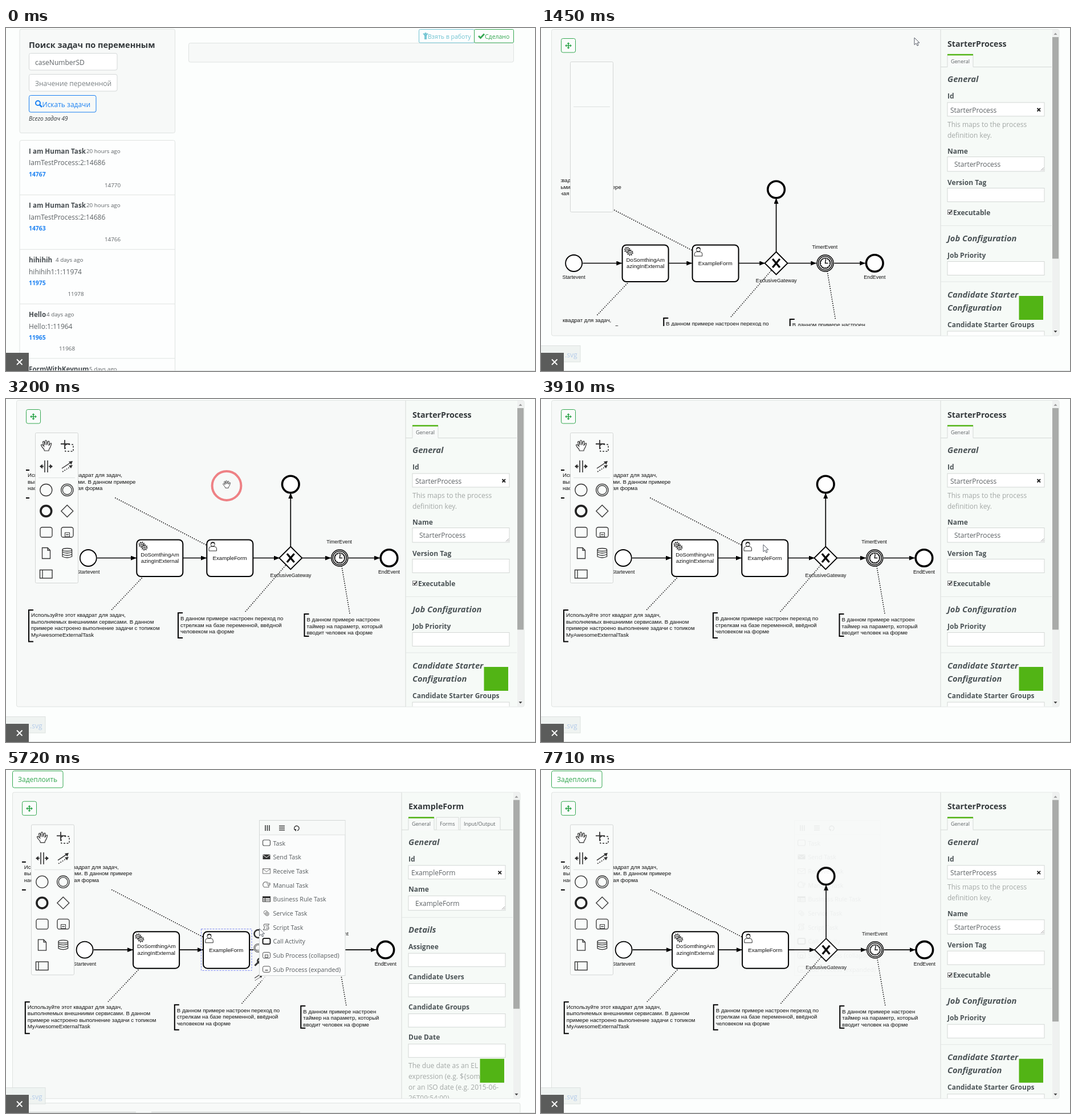
These frames come from a looping animation (928x603 px, 8.74 s). An HTML page:

```html
<!DOCTYPE html>
<html lang="ru">
<head>
<meta charset="utf-8">
<title>Process modeler</title>
<style>
html, body { margin: 0; width: 100%; height: 100%; overflow: hidden; background: #fcfefd; }
svg { display: block; width: 100%; height: 100%; }
text { font-family: "Open Sans", "Noto Sans", sans-serif; white-space: pre; }
.diagram text { font-family: "Liberation Sans", Arial, sans-serif; fill: #111; }
.b { font-weight: 700; }
.i { font-style: italic; }
</style>
</head>
<body>
<svg id="stage" viewBox="0 0 928 603">
  <defs>
    <marker id="arrow" viewBox="0 0 10 8" refX="10" refY="4" markerWidth="10" markerHeight="8" markerUnits="userSpaceOnUse" orient="auto"><path d="M0 0L10 4L0 8Z"/></marker>
    <clipPath id="canvasClip"><rect x="35" y="4" width="665" height="520"/></clipPath>
    <clipPath id="propsClip"><rect x="700" y="3" width="209" height="537.5"/></clipPath>
  </defs>
</svg>
<script>
const INK = '#33383b', GREY = '#5d6265', MUTED = '#a3a8a6', LINE = '#dfe3e1', PANEL = '#f7f9f8';
const BLUE = '#1a80f2', GREEN = '#35a852';

const text = (x, y, s, size = 12, fill = GREY, cls = '', extra = '') =>
  `<text x="${x}" y="${y}" font-size="${size}" fill="${fill}" class="${cls}" ${extra}>${s}</text>`;
const box = (x, y, w, h, fill = 'none', stroke = 'none', r = 0, sw = 1, extra = '') =>
  `<rect x="${x}" y="${y}" width="${w}" height="${h}" rx="${r}" fill="${fill}" stroke="${stroke}" stroke-width="${sw}" ${extra}/>`;
const ring = (x, y, r, sw = 1.3, stroke = '#333', fill = 'none') =>
  `<circle cx="${x}" cy="${y}" r="${r}" fill="${fill}" stroke="${stroke}" stroke-width="${sw}"/>`;
const path = (d, sw = 1.3, stroke = '#333', fill = 'none', extra = '') =>
  `<path d="${d}" fill="${fill}" stroke="${stroke}" stroke-width="${sw}" ${extra}/>`;
const group = (s, attrs = '') => `<g ${attrs}>${s}</g>`;
const at = (x, y, s, k = 1) => group(s, `transform="translate(${x} ${y}) scale(${k})"`);
const diamond = (x, y, r, sw, fill = 'none', stroke = '#333') =>
  path(`M${x} ${y - r}L${x + r} ${y}L${x} ${y + r}L${x - r} ${y}Z`, sw, stroke, fill);
const middle = 'text-anchor="middle"', end = 'text-anchor="end"';

const hand = path('M-3 9L-4 6Q-8 2 -9 -1Q-8 -3 -6 -1L-4 1L-6 -6Q-5 -9 -3.5 -6.5L-2 -1V-8Q-.5 -11 1 -8V-1L3 -7Q5 -9 5.5 -6.5L4.5 0L7.5 -4Q9.5 -5 9 -2.5Q7 4 5 6.5L4.5 9Z', 1.2, '#333', '#fff');
const gear = (x, y, r) => ring(x, y, r, 1, '#222', '#fff') + ring(x, y, r * .4, 1, '#222') +
  `<circle cx="${x}" cy="${y}" r="${r + 1}" fill="none" stroke="#222" stroke-width="2" stroke-dasharray="${r * .4} ${(r + 1) * Math.PI / 4 - r * .4}"/>`;
const wrench = path('M-6 6L2 -2', 3) + path('M6.5 -4A4 4 0 1 1 2.5 -6.5', 2.4);
const connect = path('M-9 4L6 -6', 1.5) + path('M10 -9L7.5 -2.5L3 -8Z', 0, 'none', '#333') +
  path('M-8 10L6 1', 1.5, '#333', 'none', 'stroke-dasharray="2 2"') + path('M10 -2L7 4L3 -1Z', 0, 'none', '#333');

function listPage() {
  let s = box(24, 2, 272.5, 182.5, PANEL, LINE, 3) +
    text(40, 34.5, 'Поиск задач по переменным', 14.5, INK, 'b') +
    box(40.5, 44.5, 154.5, 29.5, '#fff', '#d4d8d8', 3) + text(51, 64.5, 'caseNumberSD') +
    box(40.5, 81.5, 154.5, 29.5, '#fff', '#d4d8d8', 3) + text(51, 101.5, 'Значение переменной', 12, '#7c8285') +
    box(40.5, 118.5, 117.5, 29.5, 'none', BLUE, 3) +
    ring(56, 132, 4, 2, BLUE) + path('M59 135L63 139', 2.6, BLUE) +
    text(63.5, 138.5, 'Искать задачи', 12, BLUE) +
    text(40, 163, 'Всего задач 49', 10, INK, 'i') +
    box(24, 197.5, 272.5, 420, '#fdfefe', LINE, 3);
  const tasks = [
    ['I am Human Task', '20 hours ago', 'IamTestProcess:2:14686', 14767, 14770, 141, 201],
    ['I am Human Task', '20 hours ago', 'IamTestProcess:2:14686', 14763, 14766, 141, 201],
    ['hihihih', '4 days ago', 'hihihih1:1:11974', 11975, 11978, 87, 136.5],
    ['Hello', '4 days ago', 'Hello:1:11964', 11965, 11968, 71, 121],
    ['FormWithKeynum', '5 days ago', '', '', '', 146, 196]];
  tasks.forEach(([name, age, proc, id, num, ax, nx], k) => {
    const y = 197.5 + k * 95.85;
    if (k) s += path(`M24 ${y}H296.5`, 1, LINE);
    s += text(40, y + 23, name, 11.65, '#464c50', 'b') + text(ax, y + 22, age, 9.8) +
      text(40, y + 43.5, proc) + text(40, y + 63, id, 10.4, BLUE, 'b') +
      text(nx, y + 82, num, 9.8, GREY, '', end);
  });
  const teal = '#6fc3d1';
  return s + box(320.5, 26.5, 570, 33.5, PANEL, LINE, 3) +
    box(724.5, 2.5, 97, 23.5, '#fdfefe', teal, 2) + box(821.5, 2.5, 69, 23.5, '#fdfefe', GREEN, 2) +
    ring(736, 10, 1.2, 1.6, teal) + path('M732 9.5L734.5 12.5H737.5L740 9.5M735 12V20M737 12V20', 1.8, teal) +
    text(740, 18.5, 'Взять в работу', 10.5, teal) +
    path('M829 14L832.5 17.5L839 10.5', 2.8, GREEN) + text(840, 18.5, 'Сделано', 10.5, GREEN);
}

function diagram() {
  const flow = d => path(d, 1.7, '#000', 'none', 'marker-end="url(#arrow)"');
  const dots = d => path(d, 1.8, '#111', 'none', 'stroke-dasharray="0 3.8" stroke-linecap="round"');
  const label = (x, y, s, size = 8.8) => text(x, y, s, size, '', '', middle);
  const note = (x, y, h, tx, ty, ...lines) =>
    path(`M${x + 8} ${y}H${x}V${y + h}H${x + 8}`, 2, '#000') +
    lines.map((s, k) => text(tx, ty + k * 11.6, s, 9.65)).join('');
  const task = x => box(x, 247.5, 81, 64.5, '#fff', '#000', 7, 2);
  let ticks = '';
  for (let k = 0; k < 12; k++) ticks += `<path d="M0 -9V-7" stroke="#111" transform="rotate(${k * 30})"/>`;
  return note(33, 125, 49, 38, 137, 'Используйте этот квадрат для задач,', 'выполняемых людьми. В данном примере', 'настроена несложная форма') +
    note(40, 371, 55.5, 44, 383, 'Используйте этот квадрат для задач,', 'выполняемых внешниими сервисами. В данном', 'примере настроено выполнение задачи с топиком', 'MyAwesomeExternalTask') +
    note(302, 376, 44, 306, 389, 'В данном примере настроен переход по', 'стрелкам на базе переменной, ввёдной', 'человеком на форме') +
    note(523.5, 378, 39, 527.5, 391, 'В данном примере настроен', 'таймер на параметр, который', 'вводит человек на форме') +
    dots('M192 174L352 257') + dots('M238 315L184 372') + dots('M589 294L603 377') +
    flow('M160 279.5H229') + flow('M311 279.5H352') + flow('M433 279.5H480') +
    flow('M519 279.5H570') + flow('M601 279.5H656') + flow('M499.3 259V165') +
    ring(144.3, 279.5, 14.5, 1.8, '#000', '#fff') + label(144.3, 307, 'Startevent') +
    task(229.3) + gear(238, 256, 3.6) + gear(243, 261, 3.6) +
    label(270, 276.5, 'DoSomthingAm', 9.65) + label(270, 288, 'azingInExternal', 9.65) +
    task(352.3) + path('M356 267V263Q356 260 359.5 259.5H366Q369.5 260 369.5 263V267Z', 1, '#333', '#fff') +
    ring(362.7, 255.5, 3.6, 1, '#333', '#fff') + path('M359.5 254Q363 250 366 254', 2, '#222') +
    label(392.5, 283, 'ExampleForm', 9.65) +
    diamond(499.3, 279.5, 20, 1.8, '#fff', '#000') + path('M493 272L505.6 287M505.6 272L493 287', 3.4, '#000') +
    label(499.5, 313, 'ExclusiveGateway') + dots('M490 293L418 376') +
    ring(499.3, 150, 14.8, 3.6, '#000', '#fff') +
    ring(585.3, 279.5, 14.5, 1.5, '#000', '#fff') + ring(585.3, 279.5, 12, 1.5, '#000') +
    at(585.3, 279.5, ring(0, 0, 9, 1.6, '#111') + ticks + path('M1 -7L0 0H5', 1.5, '#111')) +
    label(584.5, 254, 'TimerEvent') +
    ring(672, 279.5, 14.8, 3.6, '#000', '#fff') + label(672, 307, 'EndEvent');
}

const paletteIcons = () =>
  at(70.5, 82, hand) +
  path('M103 72V88M96 79H112', 1.8) + box(104, 80, 14, 12, 'none', '#333', 0, 1.5, 'stroke-dasharray="3 2.5"') +
  path('M68 108V129M73 108V129', 1.6) + path('M60 118.5H66M75 118.5H81', 1.8) +
  path('M59 118.5L64 114.5V122.5ZM82 118.5L77 114.5V122.5Z', 0, 'none', '#333') +
  at(107, 118, connect) +
  ring(70.3, 160, 10.5) + ring(107.3, 160, 10.7) + ring(107.3, 160, 8) +
  ring(70.3, 197, 9.4, 3.6, '#222') + diamond(107.3, 197, 10.5, 1.3) +
  box(60, 225.5, 21, 17.5, 'none', '#333', 3.5, 1.3) + box(97, 225.5, 21, 17.5, 'none', '#333', 3.5, 1.3) +
  box(103.5, 235, 8, 7, 'none', '#333', 0, 1) + path('M105 238.5H110') +
  path('M63.5 261.5H73L77.5 266V280.5H63.5ZM73 261.5V266H77.5') +
  path('M99 265V277Q107.3 281 115.6 277V265M99 269Q107.3 273 115.6 269M99 273Q107.3 277 115.6 273') +
  '<ellipse cx="107.3" cy="265" rx="8.3" ry="2.5" fill="none" stroke="#333" stroke-width="1.3"/>' +
  box(59.5, 300.5, 21.5, 14.5, 'none', '#333', 0, 1.4) + path('M64 300.5V315');

const label = (y, s) => text(713, y, s, 12, '#4b5356', 'b');
const head = (y, s) => text(713, y, s, 14.7, '#4b5356', 'b i');
const rule = y => path(`M701 ${y}H896`, 1, '#e3e7e5');
const field = (y, h = 24) => box(713, y, 170, h, '#fff', '#d3d7d5');
const area = (y, s) => field(y, 25.5) + text(725, y + 17.5, s) +
  path(`M877 ${y + 24}L882 ${y + 19}M880 ${y + 24}L882 ${y + 22}`, 1, '#999');
const hint = (y, s) => text(713, y, s, 12, MUTED);

function propsTop(name, tabs, thumb) {
  let s = text(713, 32.5, name, 14.2, INK, 'b') + path('M701 68.5H896', 1, '#d5d9d7');
  tabs.forEach(([x, w, t], k) => {
    s += path(`M${x} 68.5V46.5H${x + w}V68.5`, 1, '#d5d9d7', '#f8faf9') + text(x + 6, 61.5, t, 9);
    if (!k) s += path(`M${x} 47H${x + w}`, 2.6, '#52b415') + path(`M${x + .5} 68.5H${x + w - .5}`, 1.4, '#f8faf9');
  });
  return s + head(95, 'General') + label(124, 'Id') + field(131) + text(718, 148.5, name) +
    path('M870.5 141L876 146.5M876 141L870.5 146.5', 1.9, '#222') + box(897, 16, 11, thumb, '#a9aba9');
}

const processProps = () => propsTop('StarterProcess', [[713, 45, 'General']], 389.5) +
  hint(173.5, 'This maps to the process') + hint(192.5, 'definition key.') +
  label(220.5, 'Name') + area(226.5, 'StarterProcess') +
  label(275.5, 'Version Tag') + field(281.5) +
  box(713.5, 320, 7.5, 7.5, '#fff', '#777') + path('M715 323.5L717 326L720.5 321', 1.5, '#222') +
  text(723, 328.5, 'Executable', 12, '#4b5356', 'b') + rule(347.5) +
  head(374.5, 'Job Configuration') + label(403.5, 'Job Priority') + field(410.5) + rule(446) +
  head(473.5, 'Candidate Starter') + head(496.5, 'Configuration') +
  label(525.5, 'Candidate Starter Groups') + field(533);

const taskProps = () => propsTop('ExampleForm', [[713, 45, 'General'], [762, 39, 'Forms'], [804, 70, 'Input/Output']], 367) +
  label(177.5, 'Name') + area(184.5, 'ExampleForm') + rule(222.5) + head(249, 'Details') +
  ['Assignee', 'Candidate Users', 'Candidate Groups', 'Due Date'].map((s, k) =>
    label(278 + k * 53.2, s) + field(285.5 + k * 53.2, 23.5)).join('') +
  ['The due date as an EL', 'expression (e.g. ${someDate})', 'or an ISO date (e.g. 2015-06-', '26T09:54:00)'].map((s, k) =>
    hint(487 + k * 19.2, s)).join('');

const modeler = () =>
  box(18.5, -35, 88.5, 29.5, '#fdfefe', GREEN, 3) + text(28, -15.5, 'Задеплоить', 12, GREEN) +
  box(18.5, 2.5, 890.5, 538.5, PANEL, LINE, 3) +
  group(group(diagram(), 'id="diagram" class="diagram"'), 'clip-path="url(#canvasClip)"') +
  box(35.5, 18.5, 25, 24.5, '#fafcfb', GREEN, 3) +
  path('M43.5 31H52.5M48 26.5V35.5', 1.7, GREEN) +
  path('M48 25l2.5 3h-5zM48 37l2.5 -3h-5zM42 31l3 -2.5v5zM54 31l-3 -2.5v5z', 0, 'none', GREEN) +
  box(51.5, 59.5, 75, 264, '#f9fbfa', '#d3d6d5', 2) + path('M57 138.5H121', 1, '#dde0df') +
  group(paletteIcons(), 'id="icons"') +
  box(701, 3, 196, 537.5, '#f6faf7') + path('M701 3V541', 1, '#d5d9d7') +
  box(897, 3, 11.5, 537.5, '#eff1f0') +
  path('M899.5 12L902.5 8.5L905.5 12Z', 0, 'none', '#999') + path('M899.5 532L902.5 535.5L905.5 532Z', 0, 'none', '#444') +
  group(group(processProps(), 'id="processProps"') + group(taskProps(), 'id="taskProps"'), 'clip-path="url(#propsClip)"') +
  box(838.5, 471, 42.5, 42, '#52b415');

const pad = () => box(434, 278, 38, 92, PANEL, 'none', 0, 0, 'opacity=".75"') +
  ring(442.5, 288, 7, 2.6) + diamond(462, 287.5, 7.5, 1.2) + box(473.5, 281.5, 15.5, 12, '#f8faf9', '#444', 3, 1.2) +
  ring(442.5, 313, 7.5, 1.1, '#555') + ring(442.5, 313, 5.5, 1.1, '#555') +
  path('M469 306H465V320H469', 1.2) + path('M455 319L464 312', 1.2, '#333', 'none', 'stroke-dasharray="2 2"') +
  at(442.5, 338, wrench) + path('M457.5 334H466.5L465.5 346H458.5ZM456 333H468M460 332V330.5H464V332M460.5 336V344M463.5 336V344', 1.1) +
  at(442.5, 363, connect, .7);

function menu() {
  const icons = [
    box(450.5, 123, 13, 10, 'none', '#555', 2.5, 1.2),
    box(450.5, 148.5, 13, 8.5, '#333') + path('M450.5 149L457 154L463.5 149', 1, '#fff'),
    box(450.5, 173.5, 13, 8.5, 'none', '#777') + path('M450.5 174L457 179L463.5 174', 1, '#777'),
    path('M451 200Q453 196 456 197H459M457 199H463V202H461V206H453Q450 204 451 200M458 202H462', 1.1, '#666'),
    box(450.5, 222.5, 13, 9, 'none', '#333') + box(450.5, 222.5, 13, 3, '#333') + path('M450 228.5H464M454.5 225V231', 1),
    ring(455.5, 250.5, 3.2, 1, '#777') + ring(458, 253, 3.2, 1, '#666', '#fbfcfc') + ring(458, 253, 1.2, .9, '#666'),
    path('M453 271H462Q458 274 461 277Q462 280 459 281H451Q455 278 453 275Q451 273 453 271M455 274H459M456 278H460', 1, '#555'),
    box(450.5, 296, 13, 10, 'none', '#222', 2.5, 2),
    box(450.5, 320.5, 13, 10.5, 'none', '#555', 2.5) + box(454.5, 325, 5, 4.5, 'none', '#555'),
    box(450.5, 345, 13, 10.5, 'none', '#555', 2.5) + path('M454.5 352H459.5', 1.5, '#555')];
  const names = ['Task', 'Send Task', 'Receive Task', 'Manual Task', 'Business Rule Task', 'Service Task', 'Script Task',
    'Call Activity', 'Sub Process (collapsed)', 'Sub Process (expanded)'];
  return box(444.5, 88.5, 150.5, 273, '#fbfcfc', '#d3d7d6') + box(445, 89, 149.5, 25, PANEL) +
    path('M445 114H595', 1, '#dde0df') +
    path('M455 97V107M458.5 97V107M462 97V107M479 98.5H489M479 102H489M479 105.5H489', 1.5) +
    path('M507 105.5A4.2 4.2 0 1 1 511 106.5', 1.3) + path('M505 104H509V108Z', 0, 'none', '#333') +
    icons.join('') + names.map((s, k) => text(468.5, 132.5 + k * 24.7, s, 10.7, '#565b5e')).join('');
}

document.getElementById('stage').innerHTML +=
  group(listPage(), 'id="list"') +
  group(
    group(box(12, 585.5, 890, 40, PANEL, LINE, 3) + path('M30 601.5H228M255 601.5H516', 1.5, '#d5d8d7'), 'id="below"') +
    group(modeler(), 'id="modeler"') +
    group(box(342.5, 279.5, 88.5, 73, 'none', 'red', 0, 1, 'id="outline" stroke-dasharray="3 2"') + pad(), 'id="selection"') +
    group(menu(), 'id="menu"') +
    box(-2, 558.5, 71, 28.5, '#eef3f1', '#dbe0de', 0, 1, 'opacity=".92"') + text(42, 578.5, '.svg', 12, '#b4cbe9'), 'id="editor"') +
  path('M0 602.5H928', 1, '#dcdfde') +
  box(0, 571, 40, 32, '#5b5c5b') + path('M19 582.5L28.5 592M28.5 582.5L19 592', 1.8, '#fff') +
  group(ring(0, .5, 25.4, 4, '#ee8185'), 'id="click"') +
  group(path('M0 0V12.5L3 9.8L5 14.2L7 13.3L5.1 9H9Z', 1, '#555b66', '#fff'), 'id="pointer"') +
  group(at(0, -2, hand, .72), 'id="grab"');

const $ = Object.fromEntries([...document.querySelectorAll('svg g[id], #outline')].map(e => [e.id, e]));
const show = (e, on) => e.setAttribute('display', on ? 'inline' : 'none');
const move = (e, x, y) => e.setAttribute('transform', `translate(${x} ${y})`);

const LOOP = 8740;
const ticks = [0, 320, 910, 1080, 1450, 1630, 2030, 2180, 2330, 2480, 2640, 2790, 2930, 3070, 3200, 3330, 3470, 3610, 3760, 3910,
  4520, 4680, 4810, 4950, 5250, 5400, 5550, 5700, 5870, 6050, 6220, 6360, 6780, 7230, 7390, 7550, 7710];
const mouse = [[320, 730, 14], [910, 690, 8], [1080, 622, 6], [1450, 655, 17], [1630, 661, 145], [2030, 648, 152], [2790, 298, 285],
  [3070, 371, 171], [3200, 387, 152], [3330, 387, 152], [3910, 390, 256], [4520, 384, 291], [4810, 384, 291], [5250, 441, 336],
  [5550, 441, 336], [6220, 457, 81], [6360, 405, 132]];
const drag = [[2790, -86.7, 134], [3070, -16, 20], [3200, 0, 0]];
const clicks = [[2930, 3330], [4520, 4680], [5250, 5550], [6780, 7230]];

function sample(keys, t) {
  const k = keys.findIndex(p => p[0] > t);
  if (k === 0) return keys[0].slice(1);
  if (k < 0) return keys[keys.length - 1].slice(1);
  const [a, b] = [keys[k - 1], keys[k]], f = (t - a[0]) / (b[0] - a[0]);
  return [1, 2].map(n => a[n] + (b[n] - a[n]) * f);
}

function draw(time) {
  const t = ticks.filter(s => s <= time).pop();
  const selected = t >= 4520 && t < 7230;
  show($.list, t < 1450);
  show($.editor, t >= 1450);
  show($.icons, t >= 1630);
  show($.below, selected);
  show($.selection, selected);
  show($.taskProps, selected);
  show($.processProps, !selected);
  move($.modeler, selected ? -7 : 0, t >= 4520 ? 36.7 : 0);
  const [dx, dy] = sample(drag, t);
  move($.diagram, t >= 4520 ? .8 : dx, dy);
  $.outline.setAttribute('stroke', t < 4810 ? '#f47c7c' : '#7b86f0');
  show($.menu, t >= 5550);
  $.menu.setAttribute('opacity', t < 7230 ? 1 : t < 7390 ? .3 : t < 7550 ? .18 : t < 7710 ? .1 : .06);

  const [x, y] = sample(mouse, t), visible = t >= 320 && t < 7550, grabbing = t >= 2930 && t < 3330;
  show($.pointer, visible && !grabbing);
  show($.grab, grabbing);
  show($.click, clicks.some(([a, b]) => t >= a && t < b));
  move($.pointer, x, y);
  move($.grab, x, y);
  move($.click, x, y);
}

const start = performance.now();
function frame() {
  draw((performance.now() - start) % LOOP);
  requestAnimationFrame(frame);
}
frame();
</script>
</body>
</html>
```
